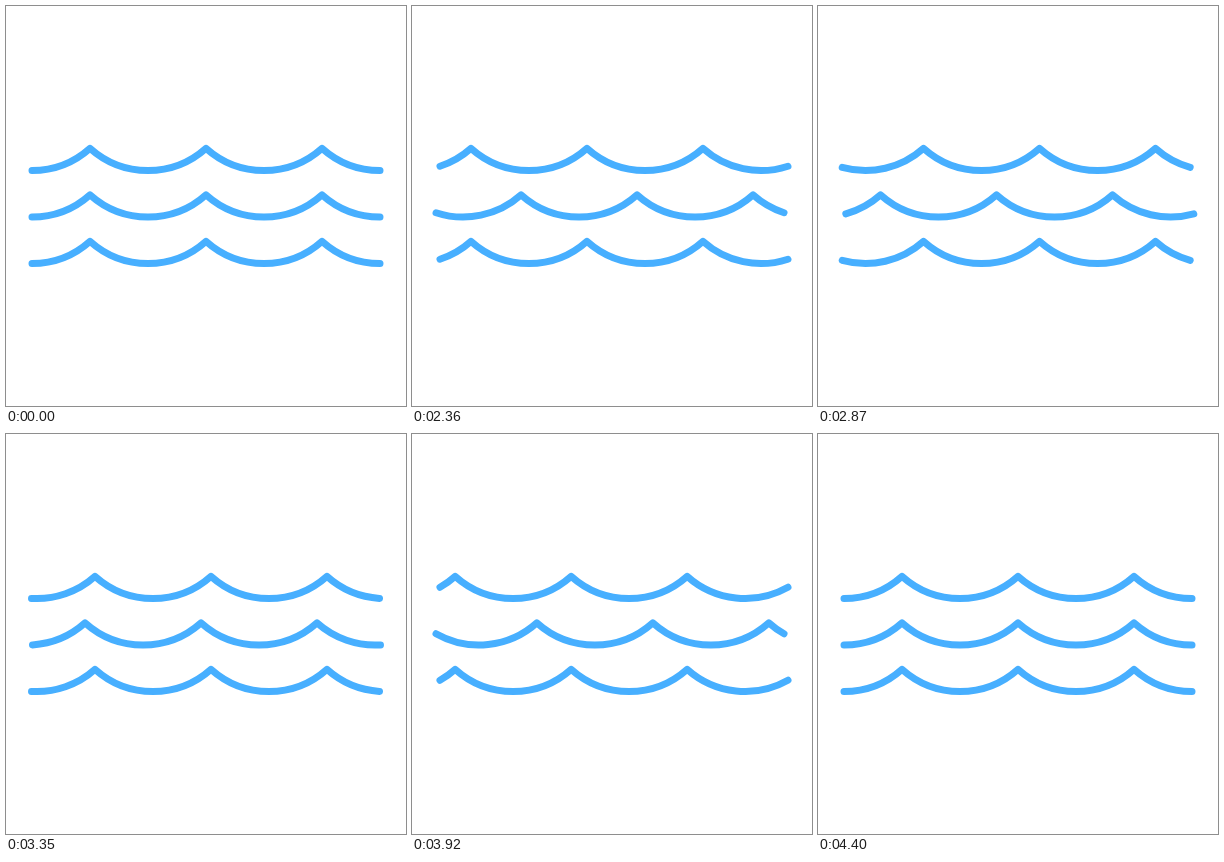
Write an HTML page that moves like this. It is 400x400 px and loops after 4.43 s.

```html
<!DOCTYPE html>
<html lang="en">
<head>
<meta charset="utf-8">
<title>Waves</title>
<style>
  html, body { margin: 0; width: 100%; height: 100%; overflow: hidden; background: #fff; }
  svg { display: block; width: 100%; height: 100%; }
  path { fill: none; stroke: #47afff; stroke-width: 7; stroke-linecap: round; stroke-linejoin: round; }
</style>
</head>
<body>
<svg viewBox="0 0 400 400"></svg>
<script>
const LOOP = 4430, REST = 2000, STEP = 30, SWING = 1200;
const PERIOD = 116, PERIODS = 6, LEFT = 26, ORIGIN = -148;

const svg = document.querySelector('svg');
const waves = [142.4, 188.9, 235.4].map((y, i) => {
  const path = document.createElementNS('http://www.w3.org/2000/svg', 'path');
  path.setAttribute('d', `M${ORIGIN} ${y}` + `a87 87 0 0 0 ${PERIOD} 0`.repeat(PERIODS));
  path.setAttribute('pathLength', PERIOD * PERIODS);
  path.setAttribute('stroke-dasharray', `${PERIOD * 3} 2000`);
  svg.append(path);
  return { path, direction: i === 1 ? 1 : -1 };
});

const ease = p => p * p * (3 - 2 * p);

// Each wave slides one period sideways and back while its visible part stays in place.
function draw(now) {
  const step = Math.max(0, Math.floor((now % LOOP - REST) / STEP));
  const swing = step * STEP / SWING;
  const shift = PERIOD * ease(swing < 1 ? swing : 2 - swing);
  for (const { path, direction } of waves) {
    const x = direction * shift;
    path.setAttribute('transform', `translate(${x} 0)`);
    path.setAttribute('stroke-dashoffset', x + ORIGIN - LEFT);
  }
}

const start = performance.now();
function tick() {
  draw(performance.now() - start);
  requestAnimationFrame(tick);
}
tick();
</script>
</body>
</html>
```
